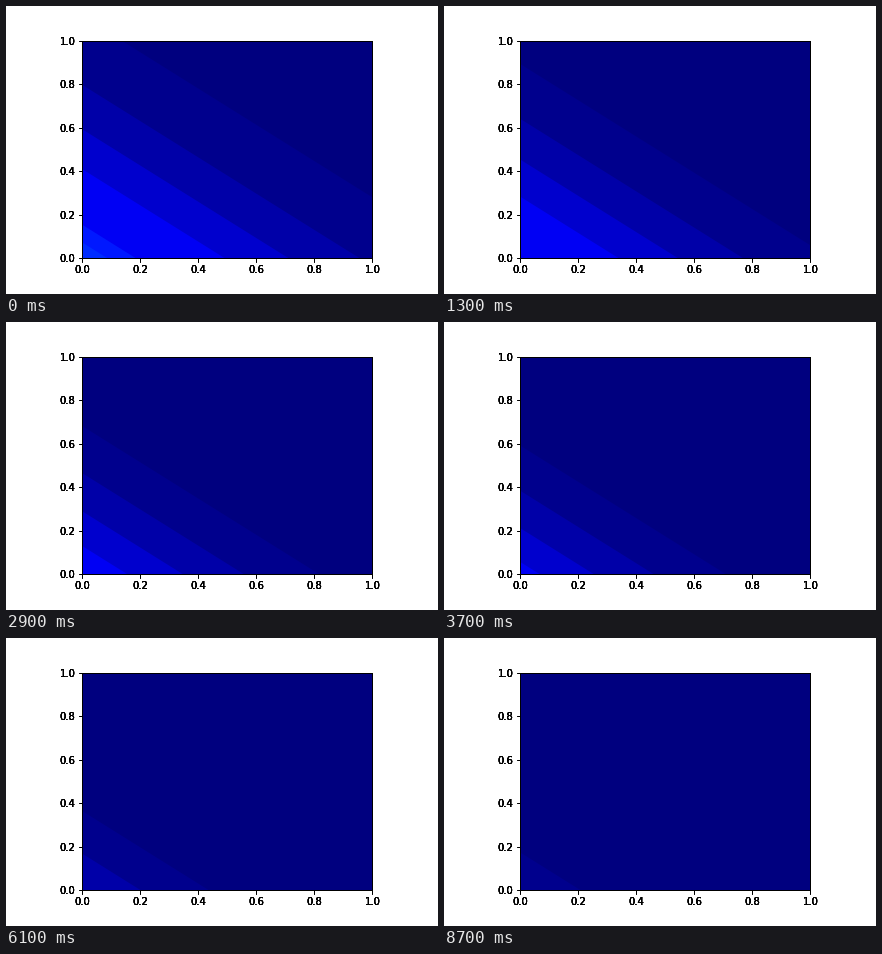
Animation of 432 by 288 pixels, one loop 10000 ms. Source, as a matplotlib script:

```python
import numpy as np
import matplotlib.pyplot as plt
from matplotlib.animation import FuncAnimation
from matplotlib.patches import Polygon

FRAMES, INTERVAL = 100, 100
WIDTH, HEIGHT, DPI = 432, 288, 72
SLOPE = 1.2  # bands follow x + SLOPE * y = const
BACKGROUND = (0, 0, 127)
BANDS = [(0, 0, 141), (0, 0, 168), (0, 0, 205), (0, 0, 244),
         (0, 24, 255), (0, 44, 255)]

plt.rcParams.update({"font.family": "DejaVu Sans", "font.size": 10})


def rgb(color):
    return tuple(c / 255 for c in color)


def band_edges(t):
    """Reach of each band along the x axis after t seconds."""
    second = 0.955 - 0.150 * t + 0.0043 * t ** 2
    first = second + 0.23 + 0.15 * np.exp(-t / 1.8)
    third = second - 0.195 - 0.05 * np.exp(-t / 2.5)
    fourth = third - 0.165 - 0.055 * np.exp(-t / 4)
    return first, second, third, fourth, 0.183 - 0.15 * t, 0.085 - 0.15 * t


def triangle(reach):
    reach = max(reach, 0)
    return [(0, 0), (reach, 0), (0, reach / SLOPE)]


fig = plt.figure(figsize=(WIDTH / DPI, HEIGHT / DPI), dpi=DPI, facecolor="white")
box = [76.44 / WIDTH, 36 / HEIGHT, 289.92 / WIDTH, 217.44 / HEIGHT]
ax = fig.add_axes(box, facecolor=rgb(BACKGROUND))

# Stacked transparent axes harden the antialiased labels and lines.
for i in range(4):
    fig.add_axes(box, facecolor="none", label=f"layer {i}")
for layer in fig.axes:
    layer.set(xlim=(0, 1), ylim=(0, 1))

bands = [ax.add_patch(Polygon(triangle(0), facecolor=rgb(color), linewidth=0))
         for color in BANDS]


def update(frame):
    for band, reach in zip(bands, band_edges(frame * INTERVAL / 1000)):
        band.set_xy(triangle(reach))
        band.set_visible(reach > 0)
    return bands


anim = FuncAnimation(fig, update, frames=FRAMES, interval=INTERVAL,
                     repeat=True, repeat_delay=0)
plt.show()
```
